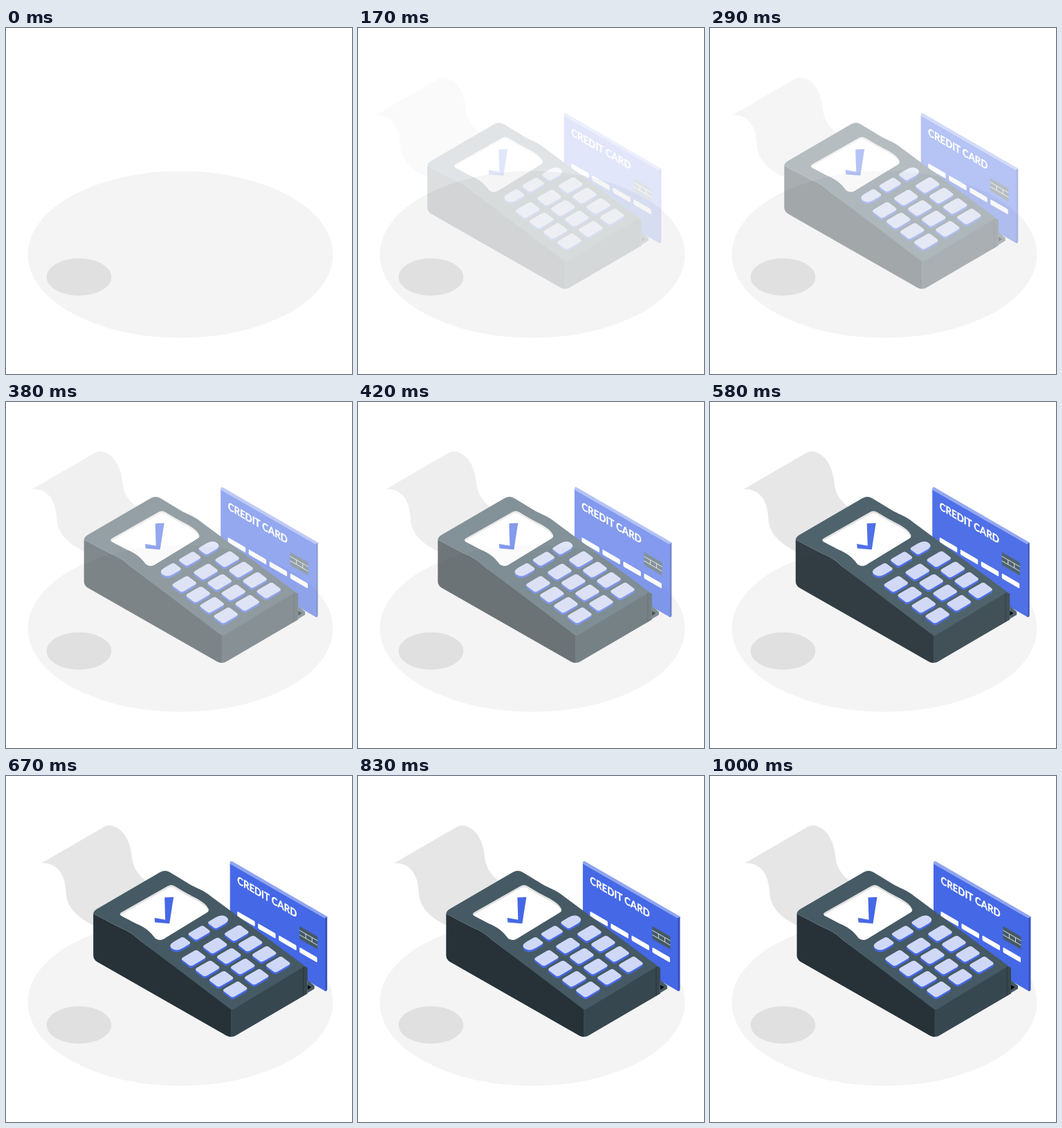
An HTML page for the animation above (1.04 s loop, 500 by 500 pixels).

```html
<!DOCTYPE html>
<html lang="en">
<head>
<meta charset="utf-8">
<title>Card terminal</title>
<style>
  html, body { margin: 0; width: 100%; height: 100%; overflow: hidden; background: #fff; }
  svg { display: block; width: 100%; height: 100%; }
  .blue { fill: #4568e6; }
  .key { fill: #d0d8f8; }
  text { font: 700 15.3px Lato, "Open Sans", sans-serif; fill: #fff; stroke: #fff; stroke-width: .4px; }
</style>
</head>
<body>
<svg viewBox="0 0 500 500">
  <defs>
    <path id="screen" d="M166,197 L233,159 Q238,156 243,159 L258,168 C270,175 287,181 292,192 Q293,195 290,197 L227,235.500 Q221,238.500 215,234.500 C208,225 200,218 187,213 L166,202 Q162,199.500 166,197Z"/>
    <clipPath id="screenClip"><use href="#screen"/></clipPath>
  </defs>

  <ellipse cx="252" cy="327.300" rx="220.500" ry="120.500" fill="#f4f4f4"/>
  <ellipse cx="105.500" cy="359.800" rx="46.800" ry="27" fill="#e0e0e0"/>

  <g id="slider" opacity="0">
    <!-- receipt -->
    <path fill="#e6e6e6" d="M50.500,126 L141,73.500 C145,71 149,71 153,72 C172,77 180,100 181,115 C182,131 190,143 202,152 L205,165 L130,220 L126,216 C101,204 86,188 86,167 C85,147 76,124 50.500,126Z"/>

    <!-- card -->
    <path fill="#8fa4f0" d="M323,126 Q323,122 326.500,123.500 L463.500,203 V205.500 L460,207 L323,129Z"/>
    <path fill="#3653bd" d="M460,205.500 L463.500,203.500 V308.500 Q463,312 460,310.500Z"/>
    <path class="blue" d="M323,127 L460.500,206 V310.800 L323,231Z"/>
    <text transform="matrix(.866 .5 0 1 333.500 155.300)">CREDIT CARD</text>
    <g id="bars" fill="#fff" transform="matrix(1 .577 0 1 333.500 195.500)"></g>
    <g transform="matrix(1 .577 0 1 423.500 217)">
      <rect width="26" height="18.500" rx="1" fill="#455a64"/>
      <path d="M0,6 H26 M0,12.500 H26 M9,6 V12.500 M18,6 V12.500" stroke="#fff" stroke-width=".7" fill="none"/>
    </g>

    <!-- terminal body -->
    <path fill="#455a64" d="M435,295 L445,303 V307.500 L435,313.500Z"/>
    <path d="M435,302 L440.500,305 L435,309Z"/>
    <path fill="#263238" d="M125.500,199 L158,216 C170,222 180,225 192,237 L325,336 V376.800 Q322,377.300 318,375.200 L131,268.500 Q125.500,265 125.500,259Z"/>
    <path fill="#37474f" d="M324.500,336 L429,274 L435,277 V314.500 L331,375.200 Q328,377 324.500,376.800Z"/>
    <path fill="none" stroke="#263238" stroke-width=".9" d="M429,275 V317.500"/>
    <path fill="#455a64" d="M125.500,199 Q126,195 131,192 L222,139 Q229,135 236,139 L264,156 C274,162 285,165 295,173.500 L430,273.500 Q431,275 429,276 L329,336.500 Q325,339 321,335 L192,237 C180,225 170,222 158,216Z"/>

    <!-- display -->
    <use href="#screen" fill="#e0e0e0"/>
    <g clip-path="url(#screenClip)"><use href="#screen" y="3" fill="#fff"/></g>
    <path class="blue" d="M228.500,175.500 L241.500,175 L235.500,213.300 L214.500,211.500 L214,205 L229.500,207.700Z"/>

    <g id="keys"></g>
  </g>
</svg>
<script>
const $ = id => document.getElementById(id);

$('bars').innerHTML = [0, 30, 60, 90]
  .map(x => `<rect x="${x}" width="25.500" height="7.500" rx="1.500"/>`).join('');

// A key cap in the keypad plane; w and h are half sizes, l and r corner radii.
function key(x, y, w, h, l, r) {
  const d = `M${l - w},${-h} H${w - r} Q${w},${-h} ${w},${r - h} V${h - r} Q${w},${h} ${w - r},${h}` +
    ` H${l - w} Q${-w},${h} ${-w},${h - l} V${l - h} Q${-w},${-h} ${l - w},${-h}Z`;
  const cap = (name, dy) =>
    `<path class="${name}" d="${d}" transform="matrix(.31 -.18 .2 .151 ${x} ${y + dy})"/>`;
  return cap('blue', 3) + cap('blue', 1.5) + cap('key', 0);
}

const pill = (i, l, r) => key(250 + 28.5 * i, 243 - 16.5 * i, 35, 31, l, r);
let keys = pill(0, 31, 12) + pill(1, 12, 12) + pill(2, 12, 31);
for (let row = 0; row < 4; row++)
  for (let col = 0; col < 3; col++)
    keys += key(270.5 + 31 * col + 20 * row, 263 - 18 * col + 15.1 * row, 37, 37, 13, 13);
$('keys').innerHTML = keys;

const bezier = (a, b, u) => 3 * (1 - u) ** 2 * u * a + 3 * (1 - u) * u * u * b + u ** 3;

// cubic-bezier(.36, -.01, .5, 1.38): settles with a small overshoot
function ease(x) {
  if (x >= 1) return 1;
  let lo = 0, hi = 1;
  for (let i = 0; i < 30; i++) {
    const mid = (lo + hi) / 2;
    if (bezier(.36, .5, mid) < x) lo = mid; else hi = mid;
  }
  return bezier(-.01, 1.38, lo);
}

// 24 steps a second, each starting on a multiple of 10 ms
const stepStart = k => Math.round(k * 100 / 24) * 10;

function draw() {
  const t = performance.now() % 1040;
  let k = 24;
  while (stepStart(k) > t) k--;
  const p = k < 3 ? 0 : ease((k + 1) / 24);
  $('slider').setAttribute('opacity', Math.min(p, 1));
  $('slider').setAttribute('transform', `translate(${30 * (p - 1)} 0)`);
  requestAnimationFrame(draw);
}
draw();
</script>
</body>
</html>
```
